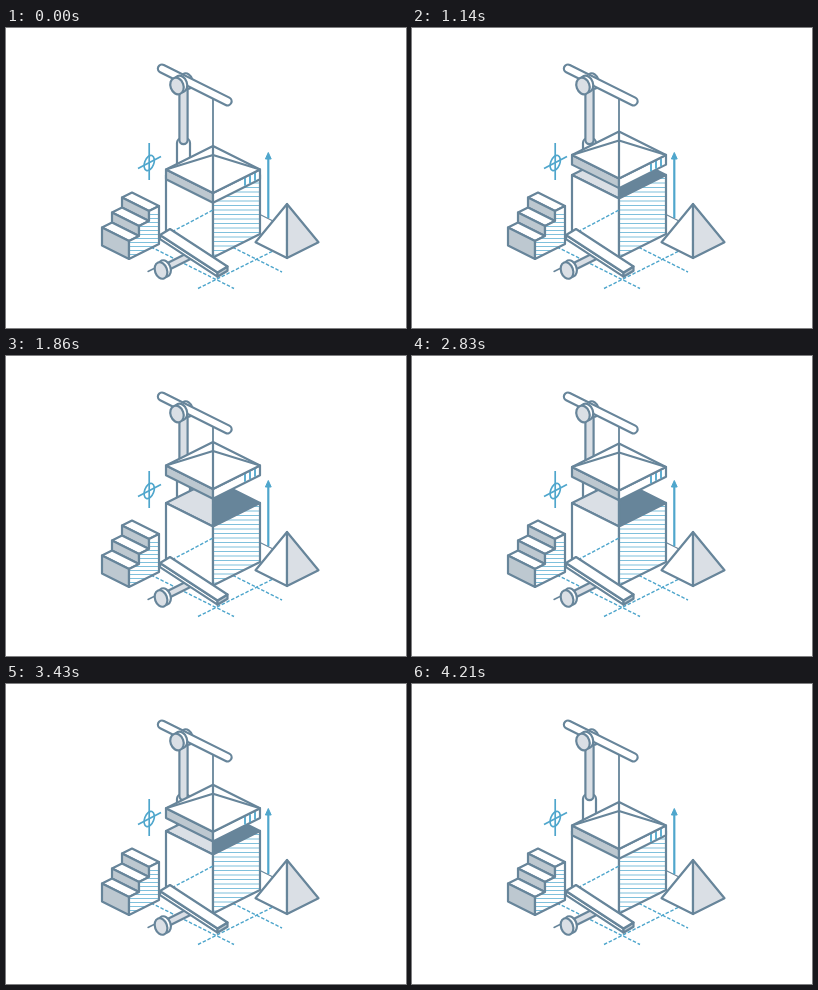
Recreate the animation shown at these times as an HTML page with a canvas. Size 400x300 px, loop 4.71 s.

```html
<!DOCTYPE html>
<html lang="en">
<head>
<meta charset="utf-8">
<title>Isometric workshop</title>
<style>
html, body { margin: 0; width: 100%; height: 100%; overflow: hidden; background: #fff; }
canvas { display: block; width: 400px; height: 300px; }
</style>
</head>
<body>
<canvas id="stage" width="400" height="300"></canvas>
<script>
const ctx = document.getElementById('stage').getContext('2d');
const INK = '#67859a', BLUE = '#4fa6cc', HATCH = '#7fc0dc';
const GRAY = '#bdc8d0', PALE = '#dadfe5', WHITE = '#fff';
const LOOP = 4710, TRAVEL = 32, SIDE = 47, TILT = -0.35;

// Isometric space around a point: a runs right and down, b left and down, h up
const iso = (x, y) => (a, b, h = 0) => [x + a - b, y + (a + b) / 2 - h];

function trace(points, closed) {
  ctx.beginPath();
  points.forEach(([x, y]) => ctx.lineTo(x, y));
  if (closed) ctx.closePath();
}

function stroke(color = INK, width = 2.2, dash = []) {
  ctx.strokeStyle = color;
  ctx.lineWidth = width;
  ctx.setLineDash(dash);
  ctx.stroke();
}

function fill(color) {
  ctx.fillStyle = color;
  ctx.fill();
}

function line(points, color, width, dash) {
  trace(points, false);
  stroke(color, width, dash);
}

function face(points, color = WHITE) {
  trace(points, true);
  fill(color);
  stroke();
}

// Parallelogram from a corner and two edge vectors
function slab([x, y], [ux, uy], [vx, vy], color) {
  face([[x, y], [x + ux, y + uy], [x + ux + vx, y + uy + vy], [x + vx, y + vy]], color);
}

function hatched(points, top, gap) {
  trace(points, true);
  fill(WHITE);
  ctx.save();
  ctx.clip();
  for (let y = top; y < 232; y += gap) line([[100, y], [300, y]], HATCH, 1.2);
  ctx.restore();
  trace(points, true);
  stroke();
}

// Isometric run through a point, extending by two horizontal reaches
function guide(x, y, before, after, slope) {
  const at = dx => [x + dx, y + dx * slope];
  line([at(-before), at(after)], BLUE, 1.4, [3.5, 1.8]);
}

function disc(x, y, rx, ry, color = WHITE) {
  ctx.beginPath();
  ctx.ellipse(x, y, rx, ry, TILT, 0, Math.PI * 2);
  fill(color);
  stroke();
}

// Round plate seen from the side: back rim, then front face
function plate(x, y, rx) {
  disc(x + 3.5, y - 2, rx, 8.5);
  disc(x, y, rx, 8.5, PALE);
}

function bar(from, to, width, color) {
  line([from, to], INK, width);
  line([from, to], color, width - 4.4);
}

function floor() {
  guide(211, 252, 66, 17, 0.5);
  guide(211, 251, 19, 58, -0.5);
  guide(249, 230.5, 27, 27, 0.5);
  line([[207, 163], [268, 193.5]], INK, 1.2);
}

function crane() {
  ctx.beginPath();
  ctx.roundRect(171, 110, 13, 40, 5);
  fill(WHITE);
  stroke();
  bar([177.5, 58], [177.5, 112], 10.4, PALE);
  disc(181, 53, 5.5, 8);
  bar([156, 40.6], [221.5, 73.3], 10.4, WHITE);
  plate(171, 58, 6.5);
}

function box() {
  const at = iso(207, 123.5), height = -59;
  const back = at(0, 0), left = at(0, SIDE), right = at(SIDE, 0), front = at(SIDE, SIDE);
  face([left, back, front], PALE);
  face([back, right, front], INK);
  face([left, front, at(SIDE, SIDE, height), at(0, SIDE, height)]);
  hatched([front, right, at(SIDE, 0, height), at(SIDE, SIDE, height)], 150.5, 4.5);
  guide(207, 182, 55, 0, -0.53);
}

function lid(lift) {
  const at = iso(207, 118 - lift), drop = -9.7;
  const back = at(0, 0), left = at(0, SIDE), right = at(SIDE, 0), front = at(SIDE, SIDE);
  const under = at(SIDE, SIDE, drop);
  face([left, front, under, at(0, SIDE, drop)], GRAY);
  face([right, front, under, at(SIDE, 0, drop)]);
  for (let b = 5; b <= 15; b += 5) {
    line([at(SIDE, b, -1), at(SIDE, b, drop + 1)], BLUE, 1.8);
  }
  face([left, back, right, front]);
  line([left, at(0, 0, -9), right]);
  line([back, front]);
}

function stairs() {
  const at = iso(126, 164.5), step = 10, width = 27, base = -38;
  const side = [at(width, 0, base), at(width, 0)];
  for (let i = 0; i < 3; i++) {
    const b = step * (i + 1), top = -step * i, bottom = i < 2 ? top - step : base;
    face([at(0, b - step, top), at(width, b - step, top), at(width, b, top), at(0, b, top)]);
    face([at(0, b, top), at(width, b, top), at(width, b, bottom), at(0, b, bottom)], GRAY);
    side.push(at(width, b, top), at(width, b, bottom));
  }
  hatched(side, 186.5, 4);
}

function pyramid() {
  const at = iso(281, 198.5), peak = at(0, 0, 22.5), size = 31.5;
  face([peak, at(0, size), at(size, size)]);
  face([peak, at(size, size), at(size, 0)], PALE);
}

function bolt() {
  line([[142, 243.5], [150, 239.5]], INK, 1.4);
  bar([164, 237.5], [184, 227.5], 9, PALE);
  plate(155, 242.5, 6);
}

function plank() {
  const corner = [154, 207], along = [57.5, 37.5], across = [10, -6], down = [0, 4.2];
  const end = [corner[0] + along[0], corner[1] + along[1]];
  slab(corner, along, down);
  slab(end, across, down, GRAY);
  slab(corner, along, across);
}

function marks() {
  line([[143.2, 115], [143.2, 152]], BLUE, 1.7);
  line([[132, 140.5], [155, 128.5]], BLUE, 1.7);
  ctx.beginPath();
  ctx.ellipse(143.2, 135, 4.6, 8, -TILT, 0, Math.PI * 2);
  stroke(BLUE, 1.7);
  line([[262.3, 130], [262.3, 190]], BLUE, 2.2);
  trace([[262.3, 124.5], [265.2, 131], [259.4, 131]], true);
  fill(BLUE);
  stroke(BLUE, 1);
}

function liftAt(t) {
  if (t < 570 || t >= 4210) return 0;
  if (t < 1860) return TRAVEL * (t - 540) / 1320;
  if (t < 2830) return TRAVEL;
  return TRAVEL * (4210 - t) / 1450;
}

function draw(t) {
  const lift = liftAt(t);
  ctx.fillStyle = WHITE;
  ctx.fillRect(0, 0, 400, 300);
  ctx.lineJoin = 'round';
  ctx.lineCap = 'butt';
  floor();
  line([[207, 68], [207, 120 - lift]], INK, 1.8);
  ctx.lineCap = 'round';
  crane();
  ctx.lineCap = 'butt';
  box();
  lid(lift);
  stairs();
  marks();
  pyramid();
  ctx.lineCap = 'round';
  bolt();
  plank();
}

const start = performance.now();
function tick() {
  draw((performance.now() - start) % LOOP);
  requestAnimationFrame(tick);
}
tick();
</script>
</body>
</html>
```
